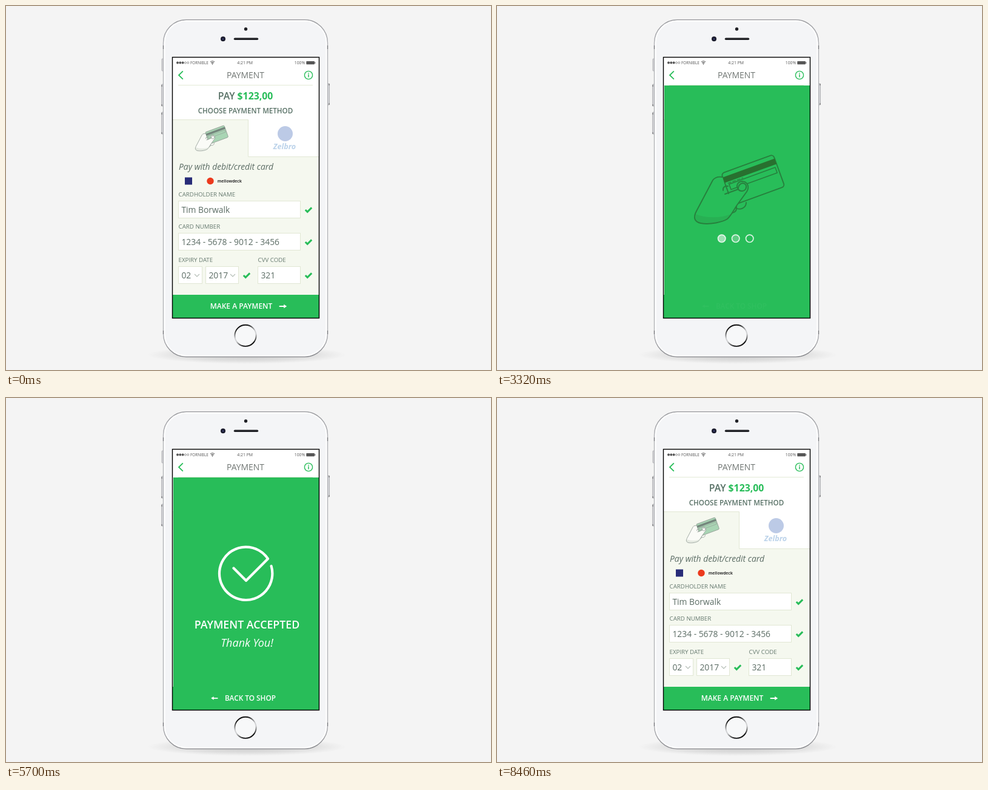
Recreate the animation shown at these times as an HTML page. Size 800 by 600 pixels, loop 10 s.

```html
<!DOCTYPE html>
<html lang="en">
<head>
<meta charset="utf-8">
<title>Payment</title>
<style>
  html, body { margin: 0; width: 100%; height: 100%; overflow: hidden; background: #f4f4f4; }
  svg { display: block; width: 800px; height: 600px; }
  text { font-family: "Open Sans", "Noto Sans", sans-serif; }
  .mid { text-anchor: middle; }
  .semi { font-weight: 600; }
  .status { fill: #555; }
  .label { font-size: 9.7px; fill: #64786e; }
  .value { font-size: 13.85px; fill: #5b6c64; }
  .box { fill: #fff; stroke: #e1e7d4; }
  .tick { fill: none; stroke: #28bd59; stroke-width: 3; }
  .chev { fill: none; stroke: #b4bdb6; stroke-width: 1.1; }
  .line { fill: none; stroke: var(--ink); stroke-width: var(--w); stroke-linecap: round; stroke-linejoin: round; }
  .skin { fill: var(--skin); }
  #iconSmall { --ink: #929d96; --w: 2.2px; --skin: #fafbf7; --card: #a9d5b4; --band: #75877d; --shade: #e6ebe2; }
  #hand { --ink: #27803d; --w: 1.9px; --skin: #28bd59; --card: #28bd59; --band: #28702f; --shade: #28b053; }
</style>
</head>
<body>
<svg viewBox="0 0 800 600">
  <defs>
    <linearGradient id="ring" x1="0.3" y1="0" x2="0.7" y2="1">
      <stop offset="0.1" stop-color="#111"/>
      <stop offset="0.45" stop-color="#cfd0d2"/>
      <stop offset="0.6" stop-color="#cfd0d2"/>
      <stop offset="0.9" stop-color="#111"/>
    </linearGradient>
    <linearGradient id="rim" x1="0" y1="0" x2="0" y2="1">
      <stop offset="0" stop-color="#98999d"/>
      <stop offset="0.08" stop-color="#b4b5b9"/>
      <stop offset="0.92" stop-color="#b4b5b9"/>
      <stop offset="1" stop-color="#88898d"/>
    </linearGradient>
    <radialGradient id="shadow">
      <stop offset="0" stop-color="#777" stop-opacity="0.6"/>
      <stop offset="0.7" stop-color="#888" stop-opacity="0.24"/>
      <stop offset="1" stop-color="#999" stop-opacity="0"/>
    </radialGradient>
    <radialGradient id="blob" gradientUnits="userSpaceOnUse" cx="395.5">
      <stop id="core" stop-color="#28bd59"/>
      <stop offset="1" stop-color="#28bd59" stop-opacity="0"/>
    </radialGradient>

    <g id="handCard">
      <path class="line skin" d="M385 339C389 343 396 339 395 331M394 333C401 337 411 333 411 324"/>
      <g transform="translate(370 276) rotate(-20)">
        <rect class="line" width="91" height="56" rx="5" style="fill:var(--card)"/>
        <rect y="7" width="91" height="9.5" style="fill:var(--band)"/>
        <path class="line" d="M5 19H31" stroke-dasharray="5 3" style="stroke-width:1.2px"/>
        <rect class="line" x="6" y="21" width="81" height="9.5" style="stroke-width:1.6px"/>
      </g>
      <path class="skin" d="M372 282C366 281 360 282 356 287L329 338C323 349 326 356 336 358C352 361 372 356 380 351C386 346 390 337 396 328L412 306C417 298 413 289 404 289C396 290 395 297 398 302L380 311Z"/>
      <path d="M327 343C345 350 368 350 386 343C384 349 380 352 370 355C352 360 338 359 332 357C327 355 325 350 327 343Z" style="fill:var(--shade)"/>
      <path class="line" d="M372 282C366 281 360 282 356 287L329 338C323 349 326 356 336 358C352 361 372 356 380 351C386 346 390 337 396 328L412 306C417 298 413 289 404 289C396 290 394 297 398 302L376 310M398 302C400 306 407 306 410 302C413 297 410 292 405 292C400 293 398 297 398 302M373 304C372 299 376 296 381 297"/>
    </g>
    <path id="tick" class="tick" d="M-5.2 0L-1.8 3.4L5.2 -3.6"/>
    <path id="chev" class="chev" d="M-4 -2L0 2L4 -2"/>
    <path id="arrow" d="M-6 -1H1.5V-3.2L6.5 0L1.5 3.2V1H-6Z"/>
  </defs>

  <!-- phone -->
  <ellipse cx="397" cy="575" rx="164" ry="15" fill="url(#shadow)" opacity="0.7"/>
  <g fill="#d5d6d9" stroke="#a5a6aa" stroke-width="0.8">
    <rect x="257" y="87" width="4" height="20" rx="1"/>
    <rect x="256.6" y="129" width="4" height="36" rx="1"/>
    <rect x="256.6" y="175" width="4" height="36" rx="1"/>
    <rect x="529.5" y="128" width="4" height="35" rx="1"/>
  </g>
  <path d="M257 130v3M257 162v3M257 176v3M257 208v3M533 128v3M533 160v3" stroke="#666" stroke-width="1"/>
  <rect x="259.5" y="22.7" width="271" height="555.6" rx="38" fill="#e2e3e6" stroke="url(#rim)" stroke-width="1.4"/>
  <rect x="261.5" y="24.6" width="267" height="551.8" rx="36" fill="#f4f5f7" stroke="#fff" stroke-width="2"/>
  <path d="M259.5 65v6M259.5 535v6M530.5 65v6M530.5 535v6" stroke="#77787c" stroke-width="1.2"/>
  <circle cx="395.5" cy="38" r="2.7" fill="#202126"/>
  <circle cx="358" cy="54.3" r="4" fill="#191a2b"/>
  <circle cx="358" cy="54.3" r="1.6" fill="#343762"/>
  <path d="M377.5 54.3H414.5" stroke="#202125" stroke-width="3.4" stroke-linecap="round"/>
  <circle cx="395" cy="543.3" r="17.6" fill="#f7f8f9" stroke="url(#ring)" stroke-width="1.9"/>

  <!-- screen -->
  <rect x="275" y="85" width="241" height="429" fill="#fff"/>
  <g class="status" font-size="6.9">
    <g stroke="#555" stroke-width="0.6">
      <circle cx="283" cy="93.5" r="1.7"/><circle cx="287.3" cy="93.5" r="1.7"/><circle cx="291.6" cy="93.5" r="1.7"/>
      <circle cx="295.9" cy="93.5" r="1.5" fill="#fff"/><circle cx="300.2" cy="93.5" r="1.5" fill="#fff"/>
    </g>
    <text x="304" y="96" font-size="6.4">FORNIBLE</text>
    <path d="M337 92.2Q340.5 89.2 344 92.2M338.4 94Q340.5 92.2 342.6 94" fill="none" stroke="#555" stroke-width="1.1"/>
    <circle cx="340.5" cy="95.5" r="0.9"/>
    <text class="mid" x="394.2" y="96">4:21 PM</text>
    <text x="475.8" y="96" font-size="6.8">100%</text>
    <rect x="495.3" y="91" width="13.6" height="5.2" rx="0.8"/>
    <rect x="509.3" y="92.4" width="1.1" height="2.4"/>
  </g>
  <path d="M291.8 107.3L285 114L291.8 120.7" fill="none" stroke="#28bd59" stroke-width="1.8"/>
  <text class="mid" x="395" y="119" font-size="13.9" font-weight="500" fill="#6f7572">PAYMENT</text>
  <circle cx="499" cy="114" r="6.6" fill="none" stroke="#28bd59" stroke-width="1.4"/>
  <path d="M499 112.6V117.6M499 110V111.5" stroke="#28bd59" stroke-width="1.5"/>
  <path d="M284 130.5H506" stroke="#e3ead6"/>

  <!-- form -->
  <text class="mid semi" x="395" y="154.2" font-size="15.8" fill="#587166">PAY <tspan font-weight="700" fill="#28bd59">$123,00</tspan></text>
  <text class="mid semi" x="395" y="177.2" font-size="11.6" fill="#587166">CHOOSE PAYMENT METHOD</text>
  <rect x="275" y="187" width="241" height="289" fill="#f5f8ef"/>
  <rect x="400" y="187" width="116" height="61" fill="#fff"/>
  <path d="M275 187.5H399.5V248.5H516" fill="none" stroke="#e1e7d4"/>
  <use id="iconSmall" href="#handCard" transform="translate(312 196) scale(.366 .37) translate(-325 -243)"/>
  <circle cx="460.5" cy="210.5" r="12.5" fill="#bccae6"/>
  <text class="mid" x="459.5" y="235.5" font-size="12.6" font-weight="700" font-style="italic" fill="#bcd3ea">Zelbro</text>
  <text x="285" y="270.3" font-size="13.85" font-style="italic" fill="#5b6c64">Pay with debit/credit card</text>
  <rect x="295" y="282.5" width="12" height="12" fill="#282c78"/>
  <circle cx="337" cy="288.5" r="5.7" fill="#ec3a1d"/>
  <text x="348.8" y="291" font-size="6.7" font-weight="700" fill="#333">mellowdeck</text>

  <g class="label">
    <text x="284.6" y="314.3">CARDHOLDER NAME</text>
    <text x="284.6" y="367.3">CARD NUMBER</text>
    <text x="284.6" y="422.3">EXPIRY DATE</text>
    <text x="415.6" y="422.3">CVV CODE</text>
  </g>
  <g class="box">
    <rect x="284.5" y="321.5" width="201" height="28"/>
    <rect x="284.5" y="374.5" width="201" height="28"/>
    <rect x="284.5" y="429.5" width="39" height="28"/>
    <rect x="329.5" y="429.5" width="54" height="28"/>
    <rect x="415.5" y="429.5" width="70" height="28"/>
  </g>
  <g class="value">
    <text x="289.4" y="340.5">Tim Borwalk</text>
    <text x="289.4" y="393.5">1234 - 5678 - 9012 - 3456</text>
    <text x="289.4" y="448.5">02</text>
    <text x="334.4" y="448.5">2017</text>
    <text x="420.4" y="448.5">321</text>
  </g>
  <use href="#chev" x="315" y="444"/><use href="#chev" x="374" y="444"/>
  <use href="#tick" x="499" y="336"/><use href="#tick" x="499" y="389"/>
  <use href="#tick" x="397" y="444"/><use href="#tick" x="499" y="444"/>
  <rect x="275" y="476" width="241" height="38" fill="#28bd59"/>
  <text class="mid semi" x="388" y="499.3" font-size="12" fill="#fff">MAKE A PAYMENT</text>
  <use href="#arrow" x="456.7" y="495" fill="#fff"/>

  <!-- green overlay -->
  <g id="layer">
    <rect x="276" y="131" width="240" height="383" fill="url(#blob)"/>
    <use id="hand" href="#handCard"/>
    <g id="dots" fill="#fff" stroke="#fff"></g>
    <path id="done" d="M437.6 277A43.7 43.7 0 1 1 432 265L396 301L375.5 280.5" fill="none" stroke="#fff" stroke-width="4.2" stroke-linecap="round" stroke-linejoin="round"/>
    <g id="thanks" class="mid" fill="#fff">
      <text class="semi" x="397.5" y="379.8" font-size="17.8">PAYMENT ACCEPTED</text>
      <text x="397.5" y="409.7" font-size="18" font-style="italic">Thank You!</text>
    </g>
    <g id="back" fill="#fff">
      <use href="#arrow" transform="translate(344 494.8) scale(-.9 .9)"/>
      <text class="mid semi" x="403" y="499.3" font-size="11.8">BACK TO SHOP</text>
    </g>
  </g>
  <rect x="274.5" y="84.5" width="242" height="430" fill="none" stroke="#000" stroke-width="1.4"/>
</svg>
<script>
const LOOP = 10000, STEP = 20, SOFT = 12;
const $ = id => document.getElementById(id);
const ramp = (t, from, to) => Math.min(1, Math.max(0, (t - from) / (to - from)));
const ease = p => (1 - Math.cos(Math.PI * p)) / 2;
const fade = (id, a) => { $(id).style.opacity = a; };

// fade in from, to; fade out from, to
const pulses = [[0, 200, 300, 520], [340, 580, 640, 860], [660, 820, 840, 1020]];
$('dots').innerHTML = pulses.map((_, i) =>
  `<circle cx="${370.7 + 23 * i}" cy="383.3" r="6.2" stroke-width="1.7" stroke-opacity=".82"/>`).join('');
const dots = [...$('dots').children];

function reveal(p) {
  const r = 305 * p;
  const blob = $('blob');
  blob.setAttribute('cy', 495 - 144 * p);
  blob.setAttribute('r', r + SOFT);
  $('core').setAttribute('offset', Math.max(0, (r - SOFT) / (r + SOFT)));
}

function popScale(t) {
  const up = ease(ramp(t, 5140, 5360)), settle = ease(ramp(t, 5360, 5640));
  return 0.5 + 0.82 * up - 0.32 * settle;
}

function draw(t) {
  const shown = t > 2140 - STEP && t < 8460;
  $('layer').style.display = shown ? '' : 'none';
  if (!shown) return;

  reveal(ease(ramp(t, 2140, 2740)));
  fade('layer', 1 - ramp(t, 8020, 8460));
  const leave = 1 - ramp(t, 4960, 5200);
  fade('hand', ramp(t, 2440, 2740) * leave);
  fade('dots', ramp(t, 2430, 2740) * leave);

  const cycle = t >= 2920 && t < 4960 ? (t - 2920) % 1020 : 0;
  pulses.forEach(([a, b, c, d], i) =>
    dots[i].setAttribute('fill-opacity', ramp(cycle, a, b) * (1 - ramp(cycle, c, d))));

  const s = popScale(t);
  $('done').setAttribute('transform', `translate(396 290) scale(${s}) translate(-396 -290)`);
  fade('done', ramp(t, 5140, 5300));
  fade('thanks', ramp(t, 5240, 5700));
  const ghost = 0.03 * ramp(t, 2240, 2440);
  fade('back', (ghost + 0.97 * ramp(t, 5240, 5700)) * (1 - ramp(t, 8000, 8060)));
}

const start = performance.now();
function tick() {
  const t = (performance.now() - start) % LOOP;
  draw(Math.floor(t / STEP) * STEP);
  requestAnimationFrame(tick);
}
tick();
</script>
</body>
</html>
```
